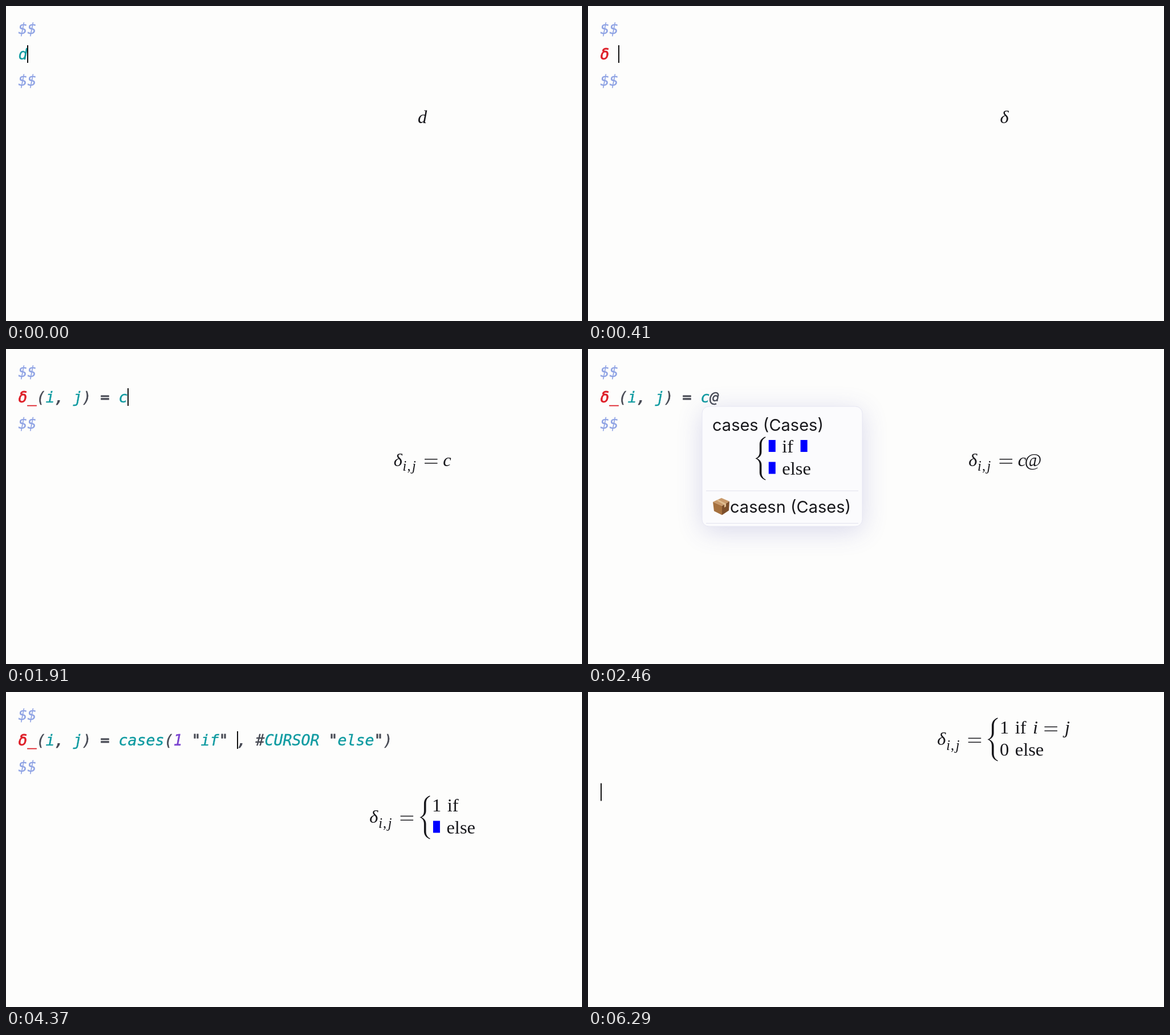
Recreate the animation shown at these times as an HTML page with a canvas. Size 1010x554 px, loop 6.43 s.

```html
<!DOCTYPE html>
<html lang="en">
<head>
<meta charset="utf-8">
<title>Typing a cases formula</title>
<style>
  html, body { margin: 0; width: 100%; height: 100%; overflow: hidden; background: #fdfdfc; }
  canvas { display: block; }
</style>
</head>
<body>
<canvas id="stage" width="1010" height="554"></canvas>
<script>
const ctx = document.getElementById('stage').getContext('2d');

const LOOP = 6430;
const INK = '#18181c';
const LEFT = 21.6, CHAR = 16, LINE = 45.4;
const MONO = '26.576px "DejaVu Sans Mono", monospace';
const SERIF = '"Liberation Serif", serif';
const SIZE = 32.5, SCRIPT = 0.75, SPACE = 10.5, REL = 9;
const ADVANCE = { 'δ': 15.5, d: 17, c: 14, i: 10.8, j: 15, ',': 9, '@': 25, '=': 25 };

// '|' marks the caret; a step without it has the caret blinked off.
const head = 'δ_(i, j) = ';
const cases = (first, second = '#CURSOR') => `${head}cases(${first}, ${second} "else")`;
const steps = [
  [0, 'd|'], [140, 'de|'], [270, 'del|'], [410, 'δ |'], [550, 'δ_|'],
  [680, 'δ_(|)'], [820, 'δ_(i|)'], [960, 'δ_(i,|)'], [1090, 'δ_(i, |)'],
  [1230, 'δ_(i, j|)'], [1370, 'δ_(i, j)|'], [1500, 'δ_(i, j) |'],
  [1640, 'δ_(i, j) =|'], [1780, head + '|'], [1910, head + 'c|'], [2050, head + 'c@|'],
  [2190, head + 'c@|', 'popup'], [2460, head + 'c@', 'popup'],
  [3010, head + 'c@|', 'popup'], [3550, head + 'c@', 'popup'],
  [3690, cases('| "if" #CURSOR')], [4100, cases(' "if" #CURSOR')],
  [4240, cases('1| "if" #CURSOR')], [4370, cases('1 "if" |')],
  [4510, cases('1 "if" i|')], [4650, cases('1 "if" i |')],
  [4780, cases('1 "if" i =|')], [4920, cases('1 "if" i = |')],
  [5060, cases('1 "if" i = j|')], [5190, cases('1 "if" i = j', '0|')],
  [5330, '|', 'done'], [5740, '', 'done'], [6290, '|', 'done']
];
const finished = cases('1 "if" i = j', '0');

function text(string, x, y, font, color = INK, align = 'left') {
  ctx.font = font;
  ctx.fillStyle = color;
  ctx.textAlign = align;
  ctx.fillText(string, x, y);
}

function rect(x, y, w, h, color) {
  ctx.fillStyle = color;
  ctx.fillRect(x, y, w, h);
}

function shape(path, x, y, color) {
  ctx.save();
  ctx.translate(x, y);
  ctx.fillStyle = color;
  ctx.fill(new Path2D(path));
  ctx.restore();
}

function drawBrace(x, y) {
  shape('M18 .3C11 3 7.8 8 7.8 14V27C7.8 33 5.5 36.5 .3 38.5C5.5 40.5 7.8 44 7.8 50V63' +
    'C7.8 69 11 74 18 76.7L18.6 75.6C13.5 73 11.4 69 11.4 63V50C11.4 44 8 40.5 3.5 38.5' +
    'C8 36.5 11.4 33 11.4 27V14C11.4 8 13.5 4 18.6 1.4Z', x, y, INK);
}

function tokenColor(token) {
  if (token[0] === 'δ') return '#de2029';
  if (token === '$$') return '#8fa3e4';
  if (/[a-z]/i.test(token)) return '#109ba1';
  return /\d/.test(token) ? '#7a43cf' : '#484b55';
}

function drawCode(line, y) {
  for (const { 0: token, index } of line.matchAll(/δ_?|\$\$|[a-z]+|\d|[^\s]/gi)) {
    const color = tokenColor(token);
    const x = LEFT + index * CHAR;
    text(token, x, y, 'italic ' + MONO, color);
    ctx.strokeStyle = color;
    ctx.lineWidth = /[δ=,"]/.test(token) ? 0.8 : 0.4;
    ctx.strokeText(token, x, y);
  }
}

// Sets one row of mathematics and returns its end; paints only when asked.
function mathRow(source, x, y, paint, scale = 1) {
  const start = x;
  let gap = 0;
  for (const [token, sub] of source.matchAll(/_\(([^)]*)\)|#CURSOR|"\w+"|[^\s]/g)) {
    if (sub !== undefined) {
      x = mathRow(sub, x, y + 8.5, paint, SCRIPT) + 2.5;
      continue;
    }
    const word = token[0] === '"';
    if (x > start) x += token === '=' ? REL : word ? SPACE : gap;
    gap = word ? SPACE : token === '=' ? REL : 0;
    if (word) {
      const string = token.slice(1, -1);
      const font = `${SIZE}px ${SERIF}`;
      ctx.font = font;
      const width = ctx.measureText(string).width;
      if (paint) text(string, x, y, font);
      x += width;
    } else if (token === '#CURSOR') {
      if (paint) rect(x + 2, y - 22, 12, 21, '#0000ff');
      x += 15;
    } else {
      const width = (ADVANCE[token] || SIZE / 2) * scale;
      if (paint && token === '=') {
        for (const rise of [12.4, 5.4]) rect(x + 1.5, y - rise, 22.5, 1.5, INK);
      } else if (paint) {
        const style = /[a-zδ]/.test(token) ? 'italic ' : '';
        text(token, x + width / 2, y, `${style}${SIZE * scale}px ${SERIF}`, INK, 'center');
      }
      x += width;
    }
  }
  return x;
}

function casesBlock(rows, x, top) {
  drawBrace(x, top);
  rows.forEach((row, i) => mathRow(row, x + 21.8, top + 28 + i * 38.6, true));
}

function drawFormula(source, shift = 0) {
  if (/^de|_$/.test(source)) return;
  const [, lead, body] = source.match(/^(.*?)(?:cases\((.*)\))?$/);
  const rows = body && body.split(/, ?/);
  const leadWidth = mathRow(lead, 0, 0, false) + (rows ? REL : 0);
  const bodyWidth = rows ? 22.8 + Math.max(...rows.map(row => mathRow(row, 0, 0, false))) : 0;
  const x = 730 - (leadWidth + bodyWidth) / 2;
  mathRow(lead, x, (rows ? 230 : 205.5) + shift, true);
  if (rows) casesBlock(rows, x + leadWidth + 1, 182 + shift);
}

function drawPackage(x, y) {
  shape('M0 7L15 0L29 6L16 14Z', x, y, '#c99a6b');
  shape('M0 7L16 14V30L2 23Z', x, y, '#a6713f');
  shape('M16 14L29 6L28 22L16 30Z', x, y, '#7d4f2b');
  shape('M6 4L9 3L23 10V15L20 17V12Z', x, y, '#e0bd91');
}

function drawPopup() {
  ctx.save();
  ctx.shadowColor = 'rgba(70, 70, 170, 0.2)';
  ctx.shadowBlur = 46;
  ctx.shadowOffsetY = 8;
  ctx.fillStyle = '#fbfbfd';
  ctx.beginPath();
  ctx.roundRect(200, 101, 281, 211, 12);
  ctx.fill();
  ctx.restore();
  ctx.strokeStyle = '#e6e6f2';
  ctx.lineWidth = 1;
  ctx.stroke();
  const label = '29px Inter, sans-serif';
  text('cases (Cases)', 218, 144, label);
  casesBlock(['#CURSOR "if" #CURSOR', '#CURSOR "else"'], 293, 154);
  rect(207, 249, 267, 1, '#e2e2ee');
  drawPackage(219, 262);
  text('casesn (Cases)', 249, 288, label);
  rect(207, 306, 267, 1, '#e2e2ee');
}

function draw(time) {
  const [, marked, mode] = steps.findLast(([at]) => at <= time);
  const source = marked.replace('|', '');
  const caret = marked.indexOf('|');
  const done = mode === 'done';
  rect(0, 0, 1010, 554, '#fdfdfc');
  if (done) {
    drawFormula(finished, -137);
  } else {
    ['$$', source, '$$'].forEach((line, i) => drawCode(line, 49 + i * LINE));
    drawFormula(source);
  }
  if (mode === 'popup') drawPopup();
  if (caret >= 0) rect(done ? 22 : 21 + caret * CHAR, done ? 160.5 : 69, 2, 31, '#111');
}

function tick(now) {
  draw(now % LOOP);
  requestAnimationFrame(tick);
}
requestAnimationFrame(tick);
</script>
</body>
</html>
```
